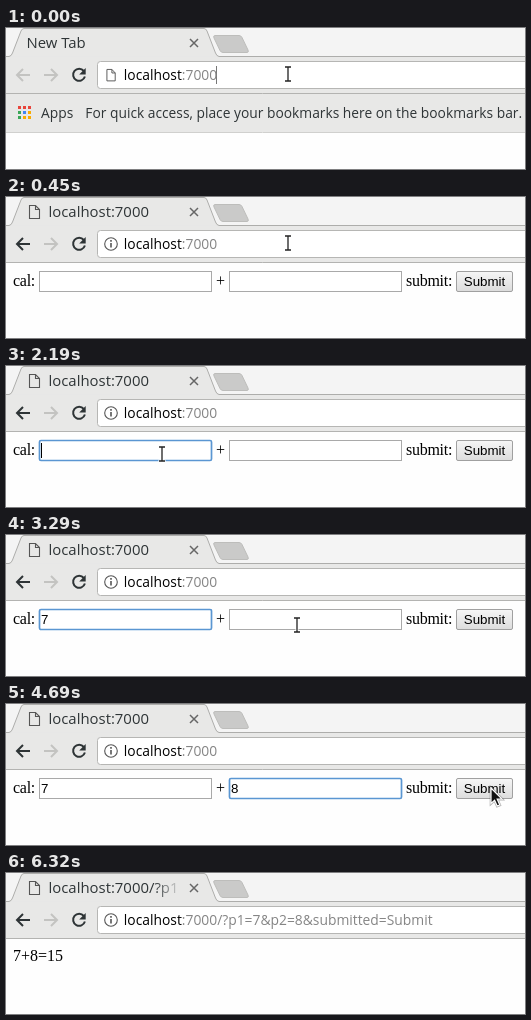
An HTML page for the animation above (7.05 s loop, 519 by 141 pixels).

```html
<!DOCTYPE html>
<html lang="en">
<head>
<meta charset="utf-8">
<title>Adding two numbers in a browser</title>
<style>
  html, body { margin: 0; height: 100%; overflow: hidden; background: #fefefe; }
  svg { display: block; width: 519px; height: 141px; }
  text { white-space: pre; }
  .ui { font: 13.8px "Open Sans", "Noto Sans", sans-serif; fill: #2e3436; }
  .tab { font-size: 14.9px; }
  .url { font-size: 13.85px; fill: #000; }
  .page { font: 16px "Liberation Serif", serif; fill: #000; }
  .label { letter-spacing: -.28px; }
  .control { font: 13.33px "Liberation Sans", sans-serif; fill: #000; }
  .field { fill: #fff; stroke: #a9a9a9; }
  .field.focus { stroke: #5a96d2; stroke-width: 1.7; rx: 1.5px; }
  #button rect { fill: url(#face); stroke: #a0a0a0; }
  #button.focus rect { stroke: #5a96d2; stroke-width: 1.7; }
  #button.down rect { fill: #d4d4d4; }
  .icon { fill: none; stroke: #2e3436; stroke-width: 2; }
  .off { stroke: #c3c3c1; }
  .thin { stroke: #555; stroke-width: 1.1; }
</style>
</head>
<body>
<svg viewBox="0 0 519 141">
  <defs>
    <linearGradient id="fade" gradientUnits="userSpaceOnUse" x1="148" x2="176" y1="0" y2="0">
      <stop stop-color="#2e3436"/><stop offset="1" stop-color="#2e3436" stop-opacity="0"/>
    </linearGradient>
    <linearGradient id="face" x2="0" y2="1">
      <stop stop-color="#f6f6f6"/><stop offset="1" stop-color="#dcdcdc"/>
    </linearGradient>
    <path id="doc" d="M.5 .5H6.500L10.500 4.500V13.500H.5ZM6.500 .5V4.500H10.500"/>
    <path id="arrow" d="M7 .5L1 6.500 7 12.500M1 6.500H14"/>
    <path id="tip" d="M0 0V15.500L3.600 12.200 6.200 18 8.800 17 6.200 11.200H11Z"/>
  </defs>

  <rect width="519" height="28" fill="#f4f4f4"/>
  <rect y="28" width="519" height="38" fill="#e8e8e7"/>
  <path d="M0 28.500H3Q5.500 28 6.500 25L15 3Q16 .5 18 .5H198Q200 .5 201 3L209.500 25Q210.500 28 213 28.500H519" fill="#e8e8e7" stroke="#adadab"/>
  <path d="M209 7.500H233Q235 7.500 236 9.500L242 22Q243 24.500 241 24.500H217Q215 24.500 214 22.500L208 10Q207 7.500 209 7.500Z" fill="#cacac9" stroke="#bdbdbb"/>
  <path d="M184 11L192 19M192 11L184 19" class="icon" style="stroke:#666;stroke-width:1.5"/>
  <path d="M0 65.500H519" stroke="#b3b3b1"/>
  <rect x="91.500" y="33.500" width="440" height="27" rx="3" fill="#fff" stroke="#b6b6b4"/>

  <use id="back" href="#arrow" x="10" y="40.500" class="icon"/>
  <use href="#arrow" class="icon off" transform="translate(52 40.500) scale(-1 1)"/>
  <path d="M77.800 43A6 6 0 1 0 78.900 48.500" class="icon"/>
  <path d="M79.700 40V46.500H73.200Z" fill="#2e3436"/>

  <text id="newTab" class="ui tab" x="20.500" y="20">New Tab</text>
  <path id="urlCaret" d="M210.500 38V56" stroke="#777"/>
  <g id="start">
    <use href="#doc" class="icon thin" transform="translate(100.500 41) scale(.83 .88)"/>
    <rect y="66" width="519" height="38" fill="#e8e8e7"/>
    <path d="M0 104.500H519" stroke="#d0d0ce"/>
    <g id="apps"></g>
    <text class="ui" x="35" y="90">Apps</text>
    <text class="ui" x="79.300" y="90">For quick access, place your bookmarks here on the bookmarks bar.</text>
  </g>

  <g id="site">
    <use href="#doc" x="23" y="8" class="icon thin"/>
    <text id="title" class="ui tab" x="42.500" y="20" style="fill:url(#fade)"></text>
  </g>
  <g id="info">
    <circle cx="105" cy="47" r="6.300" class="icon thin"/>
    <path d="M105 46V50.500M105 43V44.700" class="icon" style="stroke:#555;stroke-width:1.600"/>
  </g>
  <text class="ui url" x="117.800" y="52">localhost<tspan id="path" fill="#858585"></tspan></text>

  <g id="form">
    <text class="page label" x="7" y="89">cal:</text>
    <rect id="field1" class="field" x="33.500" y="74.500" width="172" height="20"/>
    <text id="value1" class="control" x="35" y="89"></text>
    <text class="page" x="210" y="89">+</text>
    <rect id="field2" class="field" x="223.500" y="74.500" width="172" height="20"/>
    <text id="value2" class="control" x="225" y="89"></text>
    <text class="page label" x="400" y="89">submit:</text>
    <g id="button">
      <rect x="450.500" y="74.500" width="56" height="20" rx="1.500"/>
      <text class="control" x="478.500" y="89" text-anchor="middle">Submit</text>
    </g>
    <path id="caret" d="M.5 77V92" stroke="#000"/>
  </g>
  <text id="result" class="page" x="7" y="88">7+8=15</text>

  <g id="mouse">
    <g id="beam" fill="none">
      <path d="M-3.500 -7H3.500M-3.500 7H3.500M0 -7V7" stroke="#fff" stroke-width="3"/>
      <path d="M-3 -7H3M-3 7H3M0 -7V7" stroke="#222" stroke-width="1.300"/>
    </g>
    <g id="pointer">
      <use href="#tip" stroke="#000" stroke-opacity=".3" stroke-width="2.600"/>
      <use href="#tip" fill="#111" stroke="#fff" stroke-width="1.200"/>
    </g>
  </g>
</svg>
<script>
  const LOOP = 7050;
  const $ = id => document.getElementById(id);
  const show = (id, on) => { $(id).style.display = on ? '' : 'none'; };
  const place = (id, x, y) => $(id).setAttribute('transform', `translate(${x} ${y})`);

  const red = '#e8453c', green = '#3aa757', blue = '#4285f4', amber = '#f9ab00';
  $('apps').innerHTML = [red, red, red, green, blue, amber, green, amber, amber].map((color, i) =>
    `<rect x="${12 + i % 3 * 5}" y="${78 + (i / 3 | 0) * 5}" width="3" height="3" fill="${color}"/>`).join('');

  // Mouse moves: first step, last step, step count, end point, downward bow
  const moves = [
    [570, 870, 5, 156, 88, 0],
    [2850, 3290, 7, 291, 90, 8],
    [4260, 4690, 7, 485, 84, 1],
    [5960, 6040, 2, 486, 90, 0],
    [6180, 6250, 2, 498, 120, 0]
  ];

  function mouseAt(t) {
    let x = 282, y = 46;
    for (const [from, to, steps, endX, endY, bow] of moves) {
      if (t < from) break;
      const done = Math.floor((t - from) / (to - from) * (steps - 1) + 1e-6) + 1;
      const k = Math.min(1, done / steps);
      const eased = k * k * (3 - 2 * k);
      x += (endX - x) * eased;
      y += (endY - y) * eased + bow * Math.sin(Math.PI * k);
    }
    return [Math.round(x), Math.round(y)];
  }

  function draw(t) {
    const between = (a, b) => t >= a && t < b;
    const requested = t >= 300, loaded = t >= 380, answered = t >= 5290;
    const typed1 = t >= 2570, typed2 = t >= 4190;

    show('newTab', !requested);
    show('urlCaret', !requested);
    show('site', requested);
    show('start', !loaded);
    show('info', loaded);
    show('form', loaded && !answered);
    show('result', answered);
    $('back').classList.toggle('off', !loaded);
    $('title').textContent = 'localhost:7000' + (answered ? '/?p1' : '');
    $('path').textContent = ':7000' + (answered ? '/?p1=7&p2=8&submitted=Submit' : '');

    $('value1').textContent = typed1 ? '7' : '';
    $('value2').textContent = typed2 ? '8' : '';
    $('field1').classList.toggle('focus', between(1090, 3450));
    $('field2').classList.toggle('focus', between(3450, 5070));
    $('button').classList.toggle('focus', t >= 5070);
    $('button').classList.toggle('down', between(5070, 5210));
    show('caret', between(1090, 1670) || between(2190, 3070) || between(3450, 4050) || between(4190, 4690));
    place('caret', t < 3450 ? (typed1 ? 42 : 35) : (typed2 ? 232 : 225), 0);

    const [x, y] = mouseAt(t);
    const inField = y > 74 && y < 95 && (x > 33 && x < 206 || x > 223 && x < 396);
    const overText = y > 33 && y < 61 || inField && !answered;
    place('mouse', x, y);
    show('mouse', t < 6320);
    show('beam', overText);
    show('pointer', !overText);
  }

  function tick() {
    draw(performance.now() % LOOP);
    requestAnimationFrame(tick);
  }
  tick();
</script>
</body>
</html>
```
